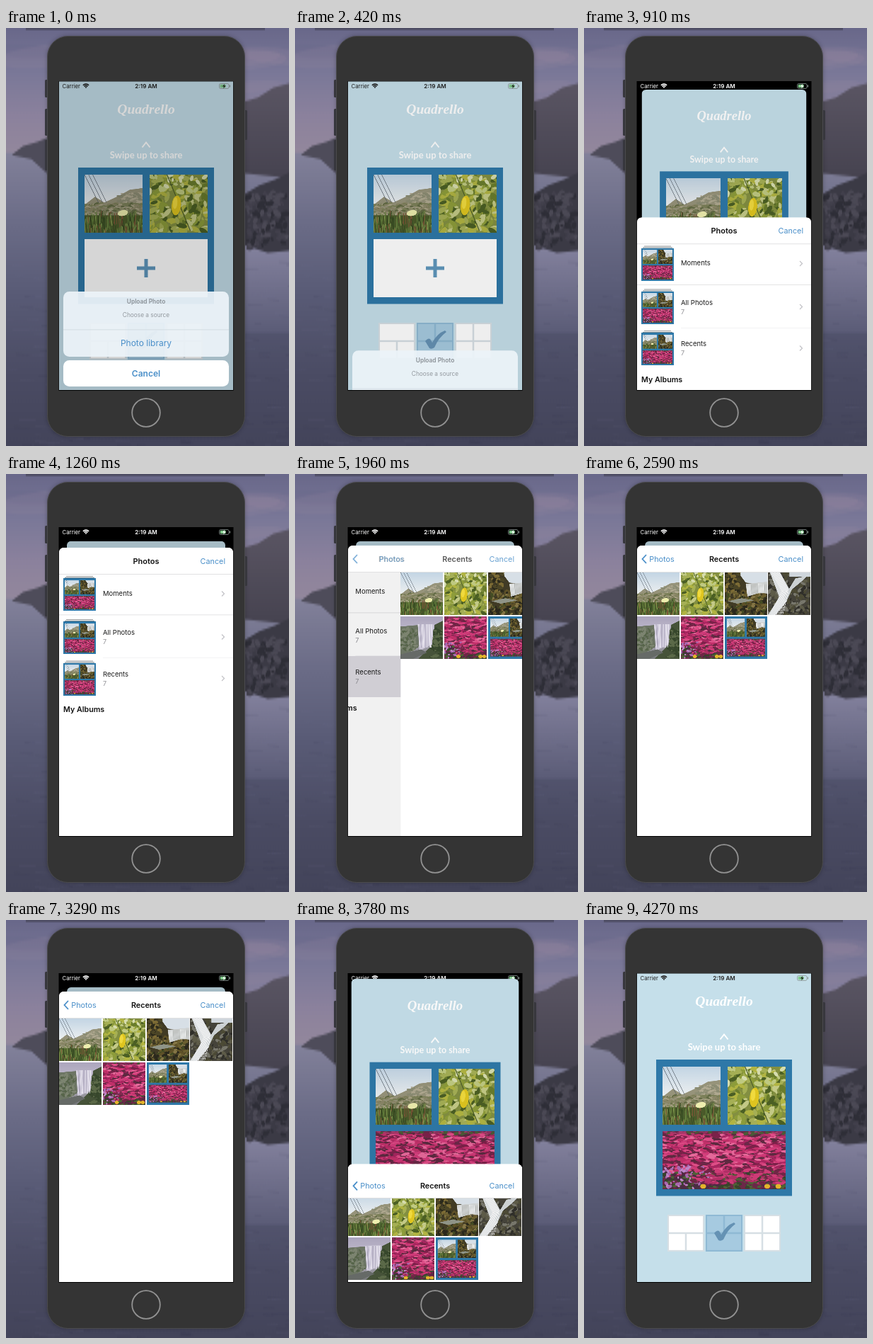
Recreate the animation shown at these times as an HTML page with a canvas. Size 400 by 590 pixels, loop 4340 ms.

```html
<!DOCTYPE html>
<html lang="en">
<head>
<meta charset="utf-8">
<title>Photo grid app</title>
<style>
html, body { margin: 0; width: 100%; height: 100%; overflow: hidden; background: #4a4a66; }
canvas { display: block; width: 400px; height: 590px; }
</style>
</head>
<body>
<canvas id="stage"></canvas>
<script>
const LOOP = 4340, STEP = 70, BLUE = '#4a8fc9', FRAME = '#2e78a8';
const stage = document.getElementById('stage');
const dpr = window.devicePixelRatio || 1;
stage.width = 400 * dpr;
stage.height = 590 * dpr;
const g = stage.getContext('2d');

let seed = 7;
const rnd = () => (seed = (seed * 16807) % 2147483647) / 2147483647;
const pick = list => list[Math.floor(rnd() * list.length)];

// Critically damped approach from 0 to 1, starting at t0
function spring(t, t0) {
  const x = Math.max(0, t - t0) / 70;
  const p = 1 - (1 + x) * Math.exp(-x);
  return p > 0.998 ? 1 : p;
}

function rect(c, x, y, w, h, fill) {
  c.fillStyle = fill;
  c.fillRect(x, y, w, h);
}
function round(c, x, y, w, h, r, fill) {
  c.beginPath();
  c.roundRect(x, y, w, h, r);
  if (fill) { c.fillStyle = fill; c.fill(); }
}
function poly(c, pts, fill) {
  c.beginPath();
  pts.forEach(p => c.lineTo(...p));
  c.fillStyle = fill;
  c.fill();
}
function line(c, pts, color, width) {
  c.beginPath();
  pts.forEach(p => c.lineTo(...p));
  c.strokeStyle = color;
  c.lineWidth = width;
  c.stroke();
}
function oval(c, x, y, rx, ry, rot, fill) {
  c.beginPath();
  c.ellipse(x, y, rx, ry, rot, 0, 7);
  c.fillStyle = fill;
  c.fill();
}
function sweep(c, y0, y1, ...colors) {
  const s = c.createLinearGradient(0, y0, 0, y1);
  colors.forEach((col, i) => s.addColorStop(i / (colors.length - 1), col));
  return s;
}
function blobs(c, n, x, y, w, h, colors, rx, ry, spin = 3) {
  for (let i = 0; i < n; i++) {
    const k = 0.5 + rnd();
    oval(c, x + rnd() * w, y + rnd() * h, rx * k, ry * k, (rnd() - 0.5) * spin, pick(colors));
  }
}
function text(s, x, y, size, color, weight = 400, align = 'left', font = 'Inter') {
  g.font = `${weight} ${size}px ${font}, sans-serif`;
  g.fillStyle = color;
  g.textAlign = align;
  g.fillText(s, x, y);
}

// Each photo is painted once, 100 units high
function photo(w, paint) {
  const cv = document.createElement('canvas');
  cv.width = w * 2;
  cv.height = 200;
  const c = cv.getContext('2d');
  c.scale(2, 2);
  paint(c, w);
  return cv;
}
function dunes(c) {
  rect(c, 0, 0, 100, 100, sweep(c, 0, 50, '#c3d5e4', '#eceff0'));
  poly(c, [[0, 52], [18, 38], [34, 48], [60, 36], [78, 26], [100, 23], [100, 100], [0, 100]], '#96937a');
  blobs(c, 240, 0, 50, 100, 20, ['#7c8059', '#a7a184', '#636b45', '#8b8768'], 4, 1.6, 1);
  blobs(c, 50, 60, 32, 40, 16, ['#8c8d74', '#b0a991'], 4, 1.6, 1);
  rect(c, 0, 70, 100, 30, '#4a5a2a');
  for (let i = 0; i < 170; i++) {
    const x = rnd() * 104 - 2, y = 68 + rnd() * 34;
    line(c, [[x, y + 14], [x + rnd() * 8 - 4, y - 6]], pick(['#67833f', '#364a22', '#84994f', '#7d5638', '#4b6330']), 1.3);
  }
  for (let i = 0; i < 3; i++) line(c, [[i * 7, 0], [24 + i * 7, 48]], '#56606a', 0.8);
  oval(c, 66, 66, 9, 5, -0.2, '#eeeeae');
}
function lemon(c) {
  rect(c, 0, 0, 100, 100, '#838f41');
  blobs(c, 220, 0, 0, 100, 100, ['#a5af55', '#6a7d2c', '#c3c986', '#8d9c3a', '#4b5f24', '#b1b442'], 7, 3.2);
  blobs(c, 24, 0, 0, 100, 30, ['#d6dcae', '#bfc981'], 5, 3);
  line(c, [[30, 0], [44, 34], [70, 96]], '#4e5f2a', 1.5);
  oval(c, 46, 53, 8, 17, 0.1, '#dfc51f');
  oval(c, 44, 49, 4, 10, 0.1, '#f0da3e');
}
function cascade(c) {
  rect(c, 0, 0, 100, 100, '#413b25');
  poly(c, [[32, 0], [100, 0], [100, 30], [50, 24]], '#d7dfe6');
  blobs(c, 200, 0, 44, 100, 56, ['#5e5128', '#2a281c', '#6b5f30', '#454d24', '#857646'], 5, 2.4);
  blobs(c, 70, 0, 0, 34, 45, ['#4b4526', '#7b6a34', '#2c2a1b'], 5, 3);
  poly(c, [[50, 27], [100, 22], [100, 50], [84, 48], [54, 57]], '#cfd2d2');
  for (let i = 0; i < 14; i++) line(c, [[52 + i * 3.5, 26], [54 + i * 3.5, 51]], pick(['#f5f6f5', '#b4b6b2']), 1.2);
  poly(c, [[8, 68], [40, 61], [70, 66], [30, 74]], '#8f9487');
}
function falls(c) {
  rect(c, 0, 0, 100, 100, '#45433a');
  blobs(c, 170, 0, 0, 100, 100, ['#302f2a', '#5d5b48', '#4c4a35', '#77766b'], 6, 3);
  poly(c, [[4, 0], [28, 0], [50, 40], [44, 68], [18, 100], [0, 100], [26, 58]], '#dde0e2');
  poly(c, [[64, 14], [92, 8], [80, 20], [56, 40], [42, 70], [36, 60]], '#ccd1d3');
  rect(c, 50, 0, 50, 10, '#cfd6dc');
  for (let i = 0; i < 9; i++) line(c, [[8 + i * 2.2, 0], [32 + i * 2, 44], [6 + i * 3.5, 100]], '#f6f6f6', 0.9);
}
function gorge(c) {
  rect(c, 0, 0, 100, 100, sweep(c, 0, 100, '#aca6bd', '#c5bfd0', '#757779'));
  poly(c, [[0, 24], [46, 20], [44, 70], [0, 100]], '#6c7564');
  poly(c, [[80, 20], [100, 10], [100, 100], [42, 100], [76, 66]], '#465339');
  blobs(c, 90, 0, 30, 38, 50, ['#57654a', '#7c8470', '#6a735f'], 5, 2.5);
  blobs(c, 90, 72, 30, 28, 66, ['#37472c', '#5b6948'], 5, 2.5);
  poly(c, [[40, 19], [78, 18], [74, 66], [44, 82]], '#ccc7d8');
  for (let i = 0; i < 14; i++) line(c, [[42 + i * 2.5, 19], [46 + i * 2, 74]], pick(['#ebe8f1', '#aaa4ba']), 1);
  poly(c, [[0, 90], [48, 78], [62, 86], [30, 100], [0, 100]], '#666a67');
}
function blooms(c, w) {
  rect(c, 0, 0, w, 100, '#6c2848');
  blobs(c, w, 0, 0, w, 16, ['#4b5a37', '#8f315f', '#a83a6b'], 4, 2, 1);
  blobs(c, w * 5, 0, 6, w, 76, ['#cf3a78', '#a82660', '#dd4d86', '#c03069', '#7c2149', '#5d2a40', '#e5699a'], 6, 1.9, 0.7);
  blobs(c, w * 1.5, 0, 70, w, 32, ['#38452b', '#4f6236', '#4c2c44'], 4, 2, 1);
  blobs(c, w * 0.3, 0, 60, w * 0.4, 38, ['#a868b0', '#bf85c6'], 3, 2);
  blobs(c, w * 0.8, w * 0.25, 64, w * 0.75, 26, ['#cd3c76', '#b22f66', '#702646'], 5, 1.9, 0.7);
  [0.33, 0.85, 0.94].forEach(x => oval(c, x * w, 95, 5, 4, 0, '#e3b42c'));
}
const single = [dunes, lemon, cascade, falls, gorge, blooms].map(f => photo(100, f));
const wide = photo(212, blooms);
const collage = photo(100, c => {
  rect(c, 0, 0, 100, 100, FRAME);
  c.drawImage(single[0], 0, 10, 200, 180, 5, 5, 43, 43);
  c.drawImage(single[2], 0, 10, 200, 180, 52, 5, 43, 43);
  c.drawImage(wide, 5, 53, 90, 42);
});
const photos = [...single, collage];

const backdrop = photo(400, c => {
  c.scale(1, 100 / 590);
  rect(c, 0, 0, 400, 590, sweep(c, 0, 190, '#69688a', '#7a7898', '#8c829d', '#95899c'));
  blobs(c, 14, 0, 20, 400, 90, ['rgba(165,145,165,.14)', 'rgba(90,90,125,.14)'], 60, 12, 0.3);
  rect(c, 0, 176, 400, 414, sweep(c, 176, 590, '#82819a', '#6a6b86', '#585a75', '#4b4c64', '#43445a'));
  poly(c, [[8, 179], [24, 167], [44, 161], [60, 154], [60, 207], [36, 185]], '#4e4c5a');
  poly(c, [[336, 104], [356, 98], [378, 84], [400, 78], [400, 212], [336, 205]], sweep(c, 80, 212, '#5a5563', '#464350'));
  rect(c, 336, 300, 64, 130, sweep(c, 300, 430, '#8684a0', '#5b5c77'));
  poly(c, [[336, 235], [358, 222], [380, 214], [400, 204], [400, 314], [370, 317], [336, 306]], '#3b3a45');
  blobs(c, 110, 340, 234, 56, 74, ['#2e2e37', '#4b4955', '#42404c'], 5, 3);
  for (let i = 0; i < 260; i++) {
    const x = rnd() * 400, y = 330 + rnd() * 260;
    line(c, [[x, y], [x + 8 + rnd() * 16, y + 1]], pick(['rgba(120,120,150,.16)', 'rgba(40,40,65,.16)']), 1.2);
  }
  rect(c, 28, 0, 338, 1.5, '#32323f');
});

function phone() {
  g.drawImage(backdrop, 0, 0, 400, 590);
  [[73, 25], [114, 38], [158, 43]].forEach(([y, h]) => round(g, 55, y, 6, h, 1.5, '#3c3c43'));
  round(g, 335, 116, 6, 42, 1.5, '#3c3c43');
  g.shadowColor = 'rgba(0,0,0,.3)';
  g.shadowBlur = 6 * dpr;
  round(g, 58.5, 11.5, 279, 565, 29, '#343434');
  g.shadowBlur = 0;
  g.strokeStyle = '#4b4b4e';
  g.lineWidth = 1;
  g.stroke();
  g.beginPath();
  g.arc(198, 543, 19.8, 0, 7);
  g.strokeStyle = '#929292';
  g.lineWidth = 1.8;
  g.stroke();
  rect(g, 74.5, 75, 247, 437, '#000');
}

function statusBar(color) {
  text('Carrier', 79.5, 85, 7.8, color);
  text('2:19 AM', 198, 85, 8.1, color, 600, 'center');
  g.strokeStyle = color;
  g.lineWidth = 1.7;
  [1, 3.4, 5.8].forEach(r => {
    g.beginPath();
    g.arc(113, 85, r, -2.35, -0.8);
    g.stroke();
  });
  round(g, 301.5, 78.5, 13.5, 7, 2);
  g.strokeStyle = '#8b9794';
  g.lineWidth = 0.8;
  g.stroke();
  round(g, 302.7, 79.7, 8, 4.6, 1, '#7fc98a');
  rect(g, 315.8, 80.5, 1.2, 3, '#8b9794');
  poly(g, [[309, 79], [305.8, 82.6], [308, 82.6], [307.2, 85.4], [310.6, 81.6], [308.4, 81.6]], color);
}

function layoutButton(x, top, bottom, picked) {
  rect(g, x, 416, 52, 52, picked ? '#8fb9d4' : '#d6dfe4');
  const row = (n, y) => {
    const w = (48 - (n - 1) * 2.5) / n;
    for (let i = 0; i < n; i++) rect(g, x + 2 + i * (w + 2.5), y, w, 22.7, picked ? '#a6cae0' : '#fff');
  };
  row(top, 418);
  row(bottom, 443.2);
  if (!picked) return;
  g.fillStyle = '#6592b4';
  g.fill(new Path2D('M184 442q4-5 7-3l3 5q7-13 18-17l2 2q-11 8-17 22-4 3-7 1z'));
}

function home(filled) {
  rect(g, 75, 75, 246, 437, '#c5dfea');
  text('Quadrello', 198, 121, 19.5, '#fff', 'italic 700', 'center', '"Liberation Serif", serif');
  line(g, [[192.5, 168.5], [198, 161.5], [203.5, 168.5]], '#fff', 2);
  text('Swipe up to share', 198, 184, 13, '#fff', 700, 'center', 'Lato');
  rect(g, 102, 197, 192, 192.5, FRAME);
  g.drawImage(single[0], 111, 207, 82, 82);
  g.drawImage(single[1], 203, 207, 82, 82);
  if (filled) {
    g.drawImage(wide, 111, 298, 174, 82);
  } else {
    rect(g, 111, 298, 174, 82, '#fff');
    rect(g, 185, 336.5, 26, 5, '#5f97bd');
    rect(g, 195.5, 326, 5, 26, '#5f97bd');
  }
  layoutButton(118, 1, 2);
  layoutButton(172, 2, 1, true);
  layoutButton(226, 2, 2);
}

function sheet(gone) {
  g.save();
  g.translate(0, gone * 140);
  round(g, 81, 372, 234, 92, 8.5, 'rgba(236,244,249,.93)');
  text('Upload Photo', 198, 389, 8.4, '#8b9197', 600, 'center');
  text('Choose a source', 198, 408, 8.3, '#92989e', 400, 'center');
  rect(g, 81, 425.5, 234, 0.8, '#cdd7de');
  text('Photo library', 198, 449, 12, BLUE, 400, 'center');
  round(g, 81, 469, 234, 37, 8.5, '#fff');
  text('Cancel', 198, 491.5, 12, BLUE, 600, 'center');
  g.restore();
}

function albumRow(label, y, count) {
  rect(g, 85, y - 25, 38, 1, '#9a9a9a');
  rect(g, 83, y - 23, 42, 1, '#6d7f88');
  g.drawImage(collage, 81, y - 21.5, 46, 46);
  text(label, 137, count ? y - 2.5 : y + 3, 9.5, '#1b1b1b');
  if (count) text(count, 137, y + 10.5, 9, '#8e8e93');
  line(g, [[305, y - 3.5], [308.5, y], [305, y + 3.5]], '#c2c2c6', 1.2);
}

function albums(picked, push) {
  g.save();
  g.translate(-74 * push, 0);
  if (picked) rect(g, 75, 257, 320, 58, '#dcdae0');
  albumRow('Moments', 166, '');
  albumRow('All Photos', 227, '7');
  albumRow('Recents', 285.5, '7');
  rect(g, 75, 195.5, 320, 0.8, '#dcdcde');
  rect(g, 137, 256.5, 260, 0.5, '#e6e6e8');
  text('My Albums', 81, 333.5, 10.7, '#111', 600);
  g.restore();
  rect(g, 75, 139, 246, 373, `rgba(0,0,0,${0.08 * push})`);
}

function library(push, shift) {
  g.save();
  g.translate(246 * (1 - push), shift * 4);
  rect(g, 75, 138, 246, 374, '#fff');
  photos.forEach((p, i) => g.drawImage(p, 75 + (i % 4) * 61.8, 139 + Math.floor(i / 4) * 62, 60, 59.5));
  g.restore();
}

function navBar(push, shift) {
  rect(g, 75, 101, 246, 37.5 + shift * 11, '#fff');
  rect(g, 75, 138 + shift * 11, 246, 0.7, '#d4d4d6');
  g.save();
  g.translate(0, shift * 12);
  const x = 198 - 88 * push;
  g.globalAlpha = 1 - push;
  text('Photos', x, 124, 11, '#111', 600, 'center');
  g.globalAlpha = push;
  text('Photos', x, 124, 10.8, BLUE, 400, 'center');
  line(g, [[88, 114], [82.5, 120], [88, 126]], BLUE, 1.8);
  text('Recents', 198 + 104 * (1 - push), 124, 10.8, '#111', 600, 'center');
  g.globalAlpha = 1 - 0.8 * push * (1 - push);
  text('Cancel', 310, 124, 10.8, BLUE, 400, 'right');
  g.restore();
}

function picker(t, up, leave) {
  const push = spring(t, 1790), shift = Math.min(1, leave * 1.65);
  g.save();
  g.translate(0, 410 * (1 - up));
  round(g, 75, 101, 246, 430, [6.5, 6.5, 0, 0], '#fff');
  g.clip();
  if (push < 1) albums(t >= 1680, push);
  if (push > 0) library(push, shift);
  navBar(push, shift);
  g.restore();
}

function draw(t) {
  g.setTransform(dpr, 0, 0, dpr, 0, 0);
  phone();
  g.save();
  g.beginPath();
  g.rect(75, 75.5, 246, 435.5);
  g.clip();

  const gone = spring(t, 280), leave = spring(t, 3640);
  const up = spring(t, 770) * (1 - leave);
  const dim = 0.16 * Math.max(1 - gone, up * up);
  const behind = up > 0.02;
  if (behind) statusBar('#fff');

  g.save();
  g.translate(198, 75 + 20 * up);
  g.scale(1 - 0.09 * up, 1 - 0.09 * up);
  g.translate(-198, -75);
  round(g, 75, 75, 246, 460, 6.5 * Math.min(1, up * 3));
  g.clip();
  home(t >= 3000);
  if (!behind) statusBar('#222');
  rect(g, 75, 75, 246, 437, `rgba(0,0,0,${dim})`);
  g.restore();

  if (gone < 1) sheet(gone);
  if (up > 0) picker(t, up, leave);
  g.restore();
}

let start;
function tick(now) {
  start ??= now;
  draw(Math.floor(((now - start) % LOOP) / STEP) * STEP);
  requestAnimationFrame(tick);
}
draw(0);
requestAnimationFrame(tick);
</script>
</body>
</html>
```
